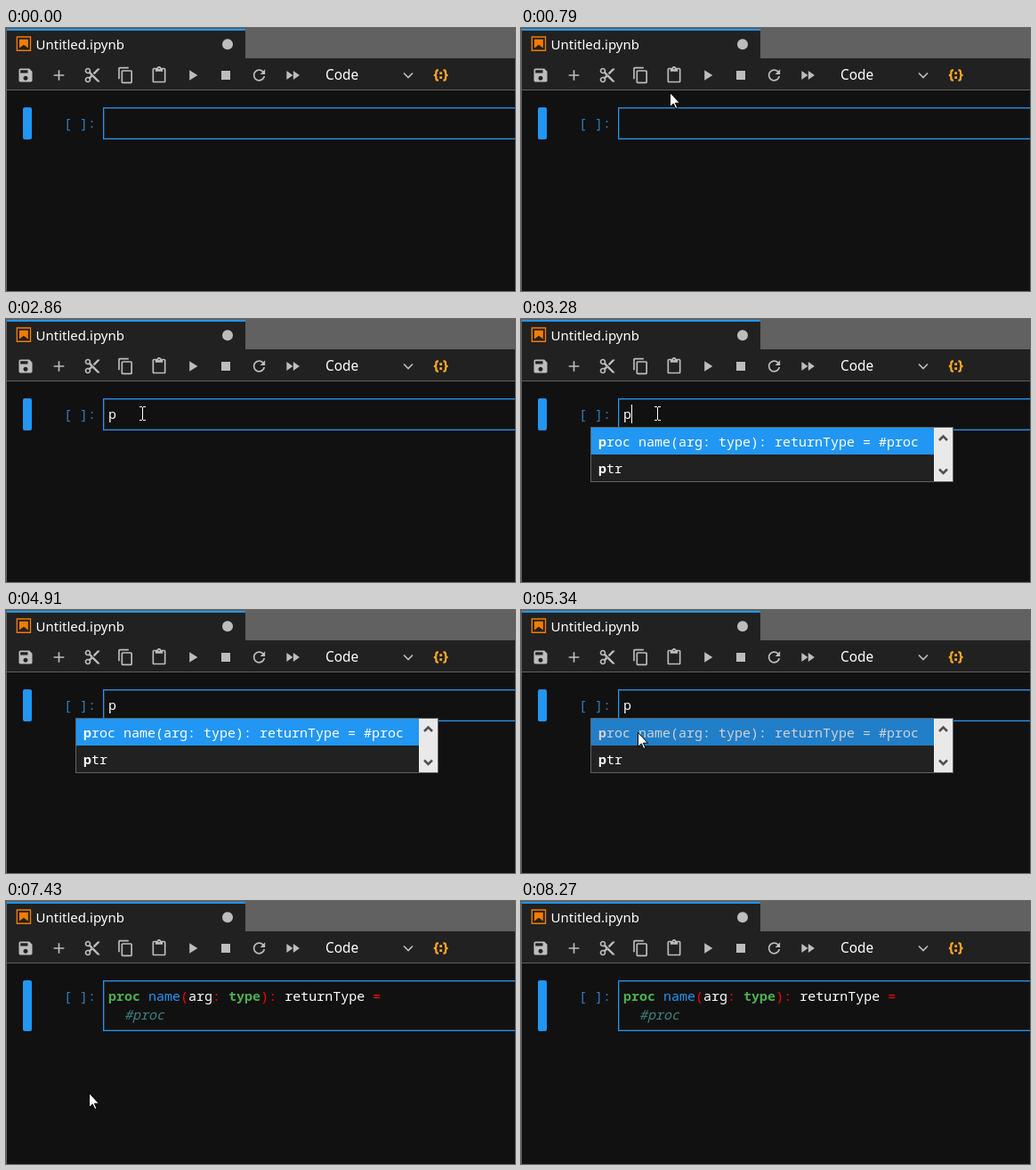
These frames come from a looping animation (572x295 px, 8700 ms). An HTML page:

```html
<!DOCTYPE html>
<html lang="en">
<head>
<meta charset="utf-8">
<title>Notebook completion</title>
<style>
html, body { margin: 0; width: 100%; height: 100%; overflow: hidden; background: #111; }
svg { display: block; width: 572px; height: 295px; }
text { white-space: pre; fill: #fff; }
.ui { font: 15px "Noto Sans", "Open Sans", sans-serif; }
.mono { font: 15px "Noto Sans Mono", "DejaVu Sans Mono", monospace; }
.b { font-weight: 700; }
.kw { font-weight: 700; fill: #4caf50; }
.def { fill: #2196f3; }
.op { fill: #f00; }
.note { font-style: italic; fill: #408080; }
</style>
</head>
<body>
<svg viewBox="0 0 572 295">
  <rect width="572" height="295" fill="#111"/>
  <rect width="572" height="34" fill="#616161"/>
  <rect y="34" width="572" height="35" fill="#212121"/>
  <rect y="69" width="572" height="1" fill="#616161"/>
  <rect x="1" y="2" width="268" height="33" fill="#212121"/>
  <rect x="1" y="1" width="268" height="2" fill="#2196f3"/>
  <rect width="1" height="295" fill="#616161"/>

  <g fill="#f57c00" transform="translate(10 7.7) scale(.9)">
    <path d="M18.7 3.3v15.4H3.3V3.3h15.4m1.5-1.5H1.8v18.4h18.4z"/>
    <path d="M16.5 16.5l-5.4-4.3-5.6 4.3v-11h11z"/>
  </g>
  <text class="ui" x="33.5" y="24">Untitled.ipynb</text>
  <circle cx="249" cy="18.3" r="6" fill="#bdbdbd"/>

  <g id="tools" fill="#bdbdbd"></g>
  <text class="ui" x="359" y="58" style="font-size:15.4px">Code</text>
  <path d="M447 50.5l5 5 5-5" fill="none" stroke="#bdbdbd" stroke-width="1.7"/>
  <g fill="none" stroke="#ffa726" stroke-width="2.2">
    <path d="M486 47.3h-.8q-1.8 0-1.8 1.9v1.8q0 2-2.6 2q2.6 0 2.6 2v1.8q0 1.9 1.8 1.9h.8"/>
    <path d="M491.4 47.3h.8q1.8 0 1.8 1.9v1.8q0 2 2.6 2q-2.6 0-2.6 2v1.8q0 1.9-1.8 1.9h-.8"/>
    <path d="M487.3 50.6h2.8M487.3 55.6h2.8" stroke-width="2.6"/>
  </g>

  <rect id="bar" x="19" y="89" width="10" rx="2" fill="#2196f3"/>
  <text class="mono" x="65" y="111.5" style="fill:#307fc1">[ ]:</text>
  <g fill="none">
    <rect id="edge" x="109.5" y="89.5" width="480" stroke="#2196f3"/>
    <rect id="glow" x="110.5" y="90.5" width="480" stroke="#64b5f6" stroke-opacity=".25"/>
  </g>

  <text class="mono" id="typed" x="115" y="112">p</text>
  <g class="mono" id="done">
    <text x="115" y="112"><tspan class="kw">proc</tspan> <tspan class="def">name</tspan><tspan class="op">(</tspan>arg<tspan class="op">:</tspan> <tspan class="kw">type</tspan><tspan class="op">):</tspan> returnType <tspan class="op">=</tspan></text>
    <text class="note" x="133" y="133">#proc</text>
  </g>
  <rect id="caret" width="1" fill="#fff"/>

  <g class="mono" id="popup">
    <rect x="78.5" y="121.5" width="407" height="61" fill="#212121" stroke="#616161"/>
    <g id="pick">
      <rect x="79" y="122" width="385" height="30" fill="#2196f3"/>
      <text x="87" y="143"><tspan class="b">p</tspan>roc name(arg: type): returnType = #proc</text>
    </g>
    <text x="87" y="173"><tspan class="b">p</tspan>tr</text>
    <rect x="464" y="122" width="21" height="60" fill="#e9e9e9"/>
    <path d="M470 136l4.5-4.5 4.5 4.5M470 168.500l4.500 4.500 4.500-4.500" fill="none" stroke="#505050" stroke-width="2.6"/>
  </g>

  <path id="arrow" d="M.5.5V16.500L4.300 12.900 6.800 18.500 8.900 17.600 6.400 12.200H11.500Z" fill="#fff" stroke="#000"/>
  <path id="beam" d="M0 .5h3m1 0h3M3.500 1v14M0 15.500h3m1 0h3" fill="none" stroke="#fff"/>
</svg>
<script>
const LOOP = 8700;
const $ = id => document.getElementById(id);

// Toolbar icons: path and the size of its drawing grid
const icons = [
  ["M17 3H5c-1.11 0-2 .9-2 2v14c0 1.1.89 2 2 2h14c1.1 0 2-.9 2-2V7l-4-4zm-5 16c-1.660 0-3-1.340-3-3s1.340-3 3-3 3 1.340 3 3-1.340 3-3 3zm3-10H5V5h10v4z", 24],
  ["M19 13h-6v6h-2v-6H5v-2h6V5h2v6h6v2z", 24],
  ["M9.640 7.640c.23-.5.36-1.050.36-1.640 0-2.210-1.790-4-4-4S2 3.790 2 6s1.790 4 4 4c.59 0 1.140-.13 1.640-.36L10 12l-2.360 2.360C7.140 14.130 6.590 14 6 14c-2.210 0-4 1.790-4 4s1.790 4 4 4 4-1.790 4-4c0-.59-.13-1.140-.36-1.640L12 14l7 7h3v-1L9.640 7.640zM6 8a2 2 0 1 1 0-4 2 2 0 0 1 0 4zm0 12a2 2 0 1 1 0-4 2 2 0 0 1 0 4zm6-7.500a.5.5 0 1 1 0-1 .5.5 0 0 1 0 1zM19 3l-6 6 2 2 7-7V3z", 24],
  ["M16 1H4c-1.100 0-2 .9-2 2v14h2V3h12V1zm3 4H8c-1.100 0-2 .9-2 2v14c0 1.100.9 2 2 2h11c1.100 0 2-.9 2-2V7c0-1.100-.9-2-2-2zm0 16H8V7h11v14z", 24],
  ["M19 2h-4.180C14.400.84 13.300 0 12 0s-2.400.84-2.820 2H5c-1.100 0-2 .9-2 2v16c0 1.100.9 2 2 2h14c1.100 0 2-.9 2-2V4c0-1.100-.9-2-2-2zm-7 0a1 1 0 1 1 0 2 1 1 0 0 1 0-2zm7 18H5V4h2v3h10V4h2v16z", 24],
  ["M8 5v14l11-7z", 24],
  ["M6 6h12v12H6z", 24],
  ["M9 13.500c-2.490 0-4.500-2.010-4.500-4.500S6.510 4.500 9 4.500c1.240 0 2.360.52 3.170 1.330L10 8h5V3l-1.760 1.760C12.150 3.680 10.660 3 9 3 5.690 3 3 5.690 3 9s2.690 6 6 6c2.970 0 5.430-2.160 5.900-5h-1.520c-.46 2-2.240 3.500-4.380 3.500z", 18],
  ["M4 18l8.500-6L4 6v12zm9-12v12l8.500-6L13 6z", 24]
];
$("tools").innerHTML = icons.map(([d, grid], i) =>
  `<path d="${d}" transform="translate(${12 + 37.5 * i} 43) scale(${20 / grid})"/>`).join("");

// Latest entry of a [time, value...] track
const at = (track, t) => track.findLast(step => step[0] <= t);

const caretFlips = [1610, 2040, 2460, 2860, 3280, 3690, 4510, 4910, 5770, 6190, 6600, 7430, 7840, 8270];
const pointer = [
  [0], [790, "arrow", 167, 72], [1190, "beam", 150, 98], [4510],
  [5340, "arrow", 131, 137], [5770, "beam", 130, 131],
  [6190, "arrow", 93, 215], [7840, "arrow", 311, 280], [8270]
];

const show = (id, on) => $(id).setAttribute("visibility", on ? "visible" : "hidden");
const set = (id, attrs) => {
  for (const key in attrs) $(id).setAttribute(key, attrs[key]);
};

function draw(t) {
  const typed = t >= 2460, done = t >= 5770;
  const height = done ? 57 : 36;
  set("bar", { height });
  set("edge", { height: height - 1 });
  set("glow", { height: height - 3 });

  show("typed", typed && !done);
  show("done", done);
  show("popup", t >= 3280 && !done);
  set("pick", { opacity: t >= 5340 ? 0.8 : 1 });

  show("caret", caretFlips.filter(flip => flip <= t).length % 2);
  set("caret", done
    ? { x: 178, y: 117, height: 22 }
    : { x: typed ? 124 : 115, y: 96, height: 21 });

  const [, kind, x, y] = at(pointer, t);
  for (const id of ["arrow", "beam"]) show(id, id === kind);
  if (kind) set(kind, { transform: `translate(${x} ${y})` });
}

const start = performance.now();
function tick() {
  draw((performance.now() - start) % LOOP);
  requestAnimationFrame(tick);
}
tick();
</script>
</body>
</html>
```
